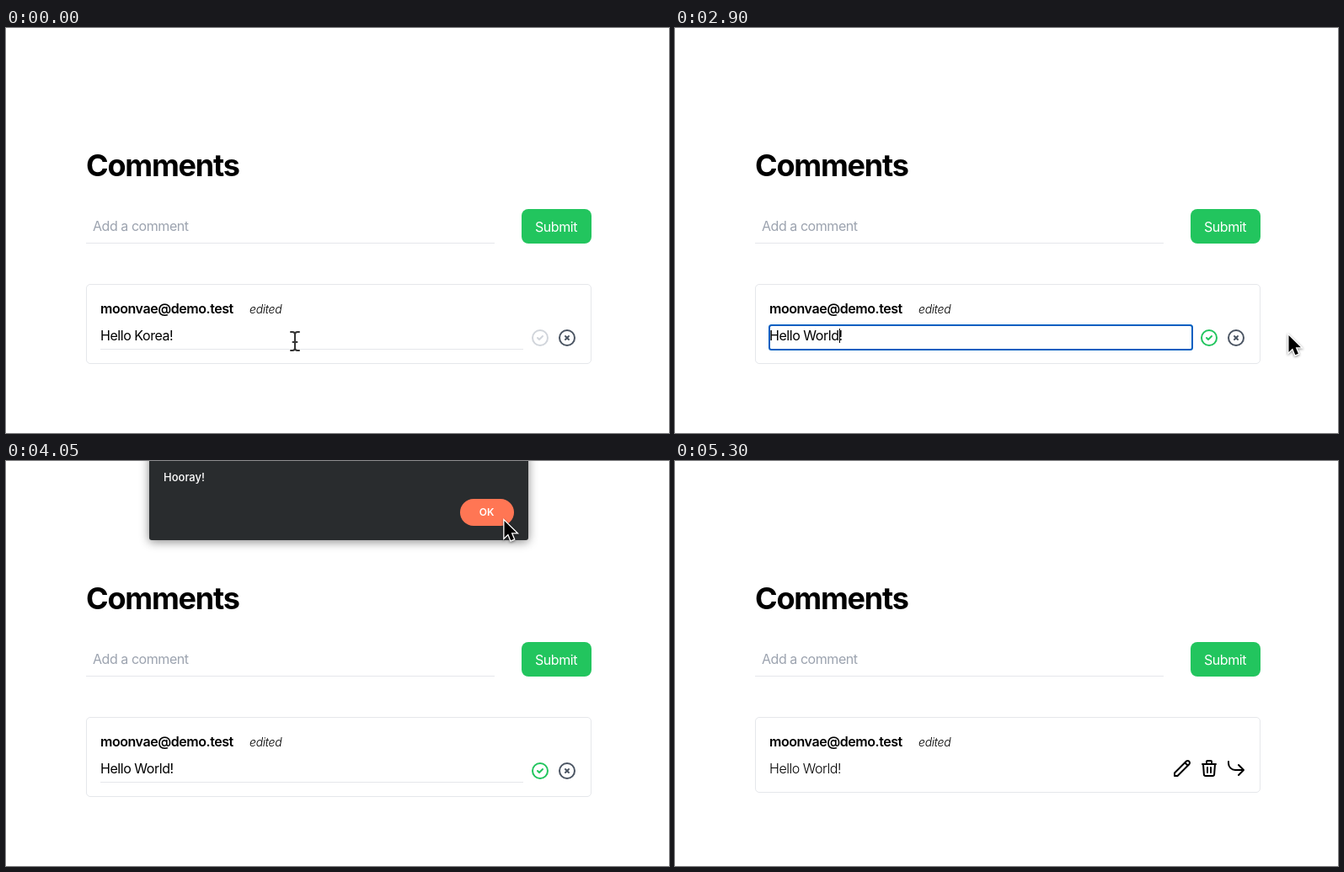
An HTML page that plays this animation: 787x481 px, repeating every 5590 ms.

```html
<!DOCTYPE html>
<html lang="en">
<head>
<meta charset="utf-8">
<title>Comments</title>
<style>
  html, body { margin: 0; width: 100%; height: 100%; overflow: hidden; background: #fff; }
  svg { display: block; }
  text { font: 400 16px Inter, sans-serif; letter-spacing: -.45px; white-space: pre; }
  .icon { fill: none; stroke: #000; stroke-width: 2; stroke-linecap: round; stroke-linejoin: round; }
  .rule { stroke: #e5e7eb; }
</style>
</head>
<body>
<svg width="787" height="481" viewBox="0 0 787 481">
  <text x="95" y="176" style="font-size:36px;font-weight:700;letter-spacing:-1.2px">Comments</text>
  <text x="103" y="241" fill="#9ca3af">Add a comment</text>
  <path class="rule" d="M95 255.5H580"/>
  <rect x="612" y="215" width="83" height="41" rx="8" fill="#22c55e"/>
  <text x="628" y="242" fill="#fff">Submit</text>

  <rect id="card" class="rule" x="95.5" y="304.5" width="599" rx="4.5" fill="none"/>
  <text x="112" y="339" style="font-weight:600">moonvae@demo.test</text>
  <text x="289" y="339" style="font-size:14px;font-weight:300;font-style:italic;letter-spacing:-.3px">edited</text>

  <g id="editor">
    <path class="rule" d="M112 381.5H614"/>
    <rect id="ring" x="112" y="353" width="502" height="29" rx="2.5" fill="none" stroke="#005fc1" stroke-width="2"/>
    <text id="field" x="112" y="371"></text>
    <path id="caret" d="M.5 357V374" stroke="#000"/>
    <path id="check" class="icon" transform="translate(622 356)" d="M9 12l2 2 4-4m6 2a9 9 0 11-18 0 9 9 0 0118 0z"/>
    <path class="icon" transform="translate(654 356)" style="stroke:#4b5563" d="M10 14l4-4m-4 0l4 4m7-2a9 9 0 11-18 0 9 9 0 0118 0z"/>
  </g>

  <g id="viewer">
    <text x="112" y="371" style="font-weight:300">Hello World!</text>
    <path class="icon" transform="translate(590 353)" d="M15.232 5.232l3.536 3.536m-2.036-5.036a2.5 2.5 0 113.536 3.536L6.5 21.036H3v-3.572L16.732 3.732z"/>
    <path class="icon" transform="translate(622 353)" d="M19 7l-.867 12.142A2 2 0 0116.138 21H7.862a2 2 0 01-1.995-1.858L5 7m5 4v6m4-6v6m1-10V4a1 1 0 00-1-1h-4a1 1 0 00-1 1v3M4 7h16"/>
    <path class="icon" transform="translate(654 353)" d="M21 14H11a8 8 0 01-8-8V4M21 14l-6-6m6 6l-6 6"/>
  </g>

  <g id="dialog">
    <rect x="170" y="-10" width="450" height="104" rx="3" fill="#292c2e" style="filter:drop-shadow(0 2px 6px #0007)"/>
    <text x="187" y="24" fill="#fff" style="font-size:13px;font-weight:500;letter-spacing:0">Hooray!</text>
    <rect x="539" y="45" width="64" height="32" rx="16" fill="#ff7654"/>
    <text x="570.5" y="65" fill="#fff" text-anchor="middle" style="font-size:12px;font-weight:600;letter-spacing:0">OK</text>
  </g>

  <g id="beam" fill="none" stroke-linecap="round">
    <path id="beamShape" stroke="#fff" stroke-width="4" d="M-5-11h2q3 0 3 3V8q0 3-3 3h-2M5-11h-2q-3 0-3 3M5 11h-2q-3 0-3-3M-2.5 1h5"/>
    <use href="#beamShape" id="beamInk"/>
    <path stroke="#333" stroke-width="2" d="M-5-11h2q3 0 3 3V8q0 3-3 3h-2M5-11h-2q-3 0-3 3M5 11h-2q-3 0-3-3M-2.5 1h5"/>
  </g>
  <path id="arrow" d="M.5 1v20l4.6-4.4 3.2 7.6 3.6-1.5-3.2-7.5h6.2z" stroke="#fff" stroke-width="2.6" paint-order="stroke" style="filter:drop-shadow(0 1.5px 1.5px #0007)"/>
</svg>
<script>
const LOOP = 5590;
const $ = id => document.getElementById(id);
const show = (id, on) => { $(id).style.display = on ? '' : 'none'; };
const within = (t, a, b) => t >= a && t < b;
$('beamInk').remove();

// [start, text after "Hello ", with | as the caret]
const edits = [
  [0, 'Korea!|'], [500, 'Korea|!'], [600, 'Kore|!'], [700, 'Kor|!'], [800, 'Ko|!'], [900, 'K|!'], [1000, '|!'],
  [1250, 'W|!'], [1400, 'Wr|!'], [1500, 'Wro|!'], [1600, 'Wrol|!'],
  [1750, 'Wro|!'], [1850, 'Wr|!'], [1950, 'W|!'],
  [2000, 'Wo|!'], [2050, 'Wor|!'], [2100, 'Worl|!'], [2200, 'World|!']
];
const blinks = [[350, 500], [1100, 1250], [2450, 2700]];

// [time, x, y] of the pointer
const track = [
  [0, 343, 372], [2350, 343, 372], [2600, 600, 362], [2800, 722, 361], [2900, 728, 364], [2950, 727, 365],
  [3200, 690, 370], [3450, 646, 369], [3600, 645, 368], [3700, 645, 368], [3850, 625, 215], [4000, 594, 82],
  [4050, 591, 70], [4150, 590, 71], [4250, 590, 72], [4500, 588, 80], [4850, 588, 80], [5050, 625, 180], [5250, 722, 422]
];

function pointerAt(t) {
  const next = track.findIndex(p => p[0] > t);
  if (next < 0) return track.at(-1).slice(1);
  const [t0, x0, y0] = track[next - 1], [t1, x1, y1] = track[next];
  const k = (t - t0) / (t1 - t0);
  return [x0 + (x1 - x0) * k, y0 + (y1 - y0) * k];
}

function draw(now) {
  const t = Math.floor(now % LOOP / 50) * 50;
  const editing = t < 4300, focused = within(t, 50, 3450);

  show('editor', editing);
  show('viewer', !editing);
  $('card').setAttribute('height', editing ? 94 : 89);

  if (editing) {
    const value = 'Hello ' + edits.findLast(e => e[0] <= t)[1];
    const field = $('field');
    field.textContent = value.replace('|', '');
    const caretX = Math.round(field.getEndPositionOfChar(value.indexOf('|') - 1).x);
    $('caret').setAttribute('transform', `translate(${caretX} 0)`);
    show('ring', focused);
    show('caret', focused && !blinks.some(([a, b]) => within(t, a, b)));
    $('check').style.stroke = t < 600 ? '#d1d5db' : '#22c55e';
  }

  show('dialog', within(t, 3650, 4300));
  $('dialog').style.opacity = Math.min(1, (t - 3600) / 100, (4350 - t) / 100);

  const [x, y] = pointerAt(t);
  const overField = t < 2900 && x < 614;
  show('beam', overField && !within(t, 600, 2350));
  show('arrow', !overField && t < 5300);
  for (const id of ['beam', 'arrow']) $(id).setAttribute('transform', `translate(${x} ${y})`);
}

const start = performance.now();
function tick() {
  draw(performance.now() - start);
  requestAnimationFrame(tick);
}
tick();
</script>
</body>
</html>
```
